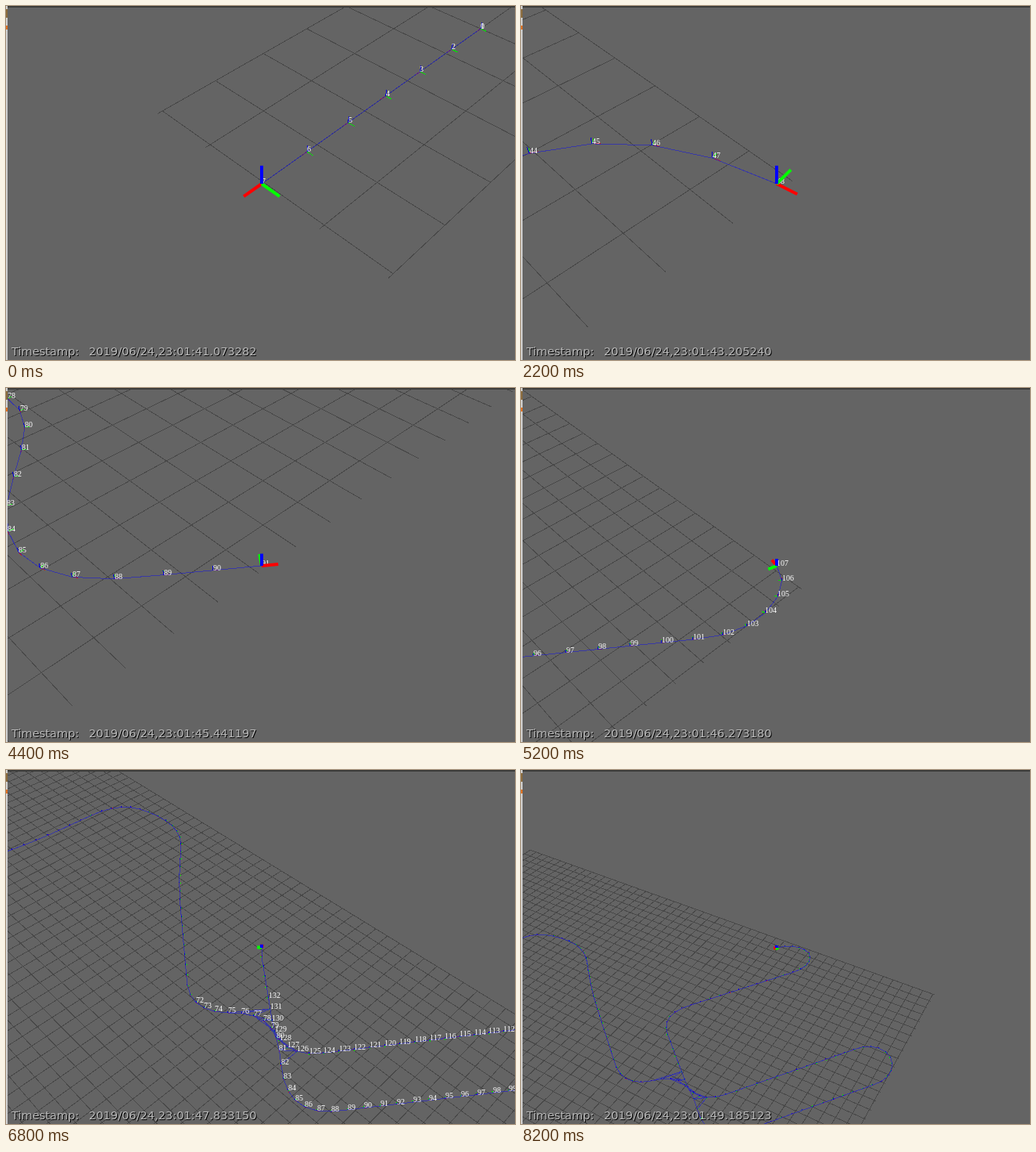
These frames come from a looping animation (651 px wide and 452 px high, 8.4 s). An HTML page:

```html
<!DOCTYPE html>
<html lang="en">
<head>
<meta charset="utf-8">
<title>Trajectory viewer</title>
<style>
  html, body { margin: 0; width: 100%; height: 100%; overflow: hidden; background: #646464; }
  svg { display: block; width: 651px; height: 452px; }
  path { fill: none; shape-rendering: crispEdges; }
  #labels { font: 10px "Liberation Serif", serif; fill: #fff; }
  #axes line { stroke-width: 4; }
  .stamp { font: 14.6px "DejaVu Sans", sans-serif; }
</style>
</head>
<body>
<svg viewBox="0 0 651 452">
  <rect width="651" height="452" fill="#646464"/>
  <path id="grid" stroke="#484848"/>
  <path id="nodeX" stroke="#d01414"/>
  <path id="nodeY" stroke="#00e000"/>
  <path id="track" stroke="#2222c8" stroke-opacity=".65"/>
  <path id="nodeZ" stroke="#0000d8"/>
  <g id="labels"></g>
  <g id="axes">
    <line stroke="#f00"/>
    <line stroke="#0f0"/>
    <line stroke="#00f"/>
  </g>
  <g class="stamp" fill="#000" transform="translate(1 1)">
    <text x="7" y="446">Timestamp:</text><text class="time" x="106" y="446"></text>
  </g>
  <g class="stamp" fill="#b8b8b8">
    <text x="7" y="446">Timestamp:</text><text class="time" x="106" y="446"></text>
  </g>
  <rect width="651" height="2" fill="#3c3c3a"/>
  <rect width="2" height="452" fill="#cfcfcf"/>
  <rect y="4" width="2" height="11" fill="#8a6a3c"/>
  <rect y="25" width="2" height="5" fill="#e07020"/>
</svg>
<script>
const STEP = 200, LOOP = 8400, POSES = 164;
const FOCAL = 843, CX = 327, CY = 227, NEAR = 0.5;
const R = Math.SQRT1_2;
const PHASE = 0.55;                   // grid offset along its first axis
const START = { a: 9.55, b: -40 };
const LABEL_DEPTH = 41;
const SMOOTHING = 3;                  // how many poses a corner is rounded over, each way

// The drive as a few corners: pose number, ground position
const CORNERS = [
  [1, -35.04, 21.53], [12.5, -41.86, 14.71], [18.5, -38.04, 10.89], [36, -23.4, 19.7],
  [45.1, -16.6, 26.2], [51.6, -11.15, 22.3], [59, -10.85, 15.1], [72.6, -9.05, 2.6],
  [78, -3.95, 3], [85.4, -3.3, -4.3], [104.2, 13.5, -2.1], [107.8, 13.4, 1.95],
  [126.9, -3.75, -0.55], [138.9, -5, 10.15], [155.9, 11, 12.9], [160, 10.6, 16.6],
  [166, 4.9, 16.3]
];

const POSE_KEYS = [[0, 7], [1200, 31], [3000, 63], [6000, 123], [8200, 163]];
const ZOOM_KEYS = [[0, 8.2], [3830, 8.2], [6000, 37.1], [6800, 44], [8200, 67.3]]
  .map(([time, dist]) => [time, Math.log(dist)]);

const $ = id => document.getElementById(id);
const lerp = (a, b, k) => a + (b - a) * k;
const radians = degrees => degrees * Math.PI / 180;

function follow(keys, x, column = 1) {
  let i = 0;
  while (i < keys.length - 2 && keys[i + 1][0] <= x) i++;
  const p = keys[i], q = keys[i + 1];
  return lerp(p[column], q[column], (x - p[0]) / (q[0] - p[0]));
}

// A moving average along the straight legs rounds the corners
function position(n) {
  const samples = 24, centre = Math.max(1, n);
  let u = 0, v = 0;
  for (let i = 0; i < samples; i++) {
    const at = centre + SMOOTHING * ((2 * i + 1) / samples - 1);
    u += follow(CORNERS, at, 1) / samples;
    v += follow(CORNERS, at, 2) / samples;
  }
  return { u, v };
}

const poses = Array.from({ length: POSES }, (_, n) => {
  const { u, v } = position(n), next = position(Math.max(1, n) + 0.3);
  const len = Math.hypot(next.u - u, next.v - v);
  const heading = [(next.u - u) / len, (next.v - v) / len];
  return { u, v, heading, a: -(u + v) * R, b: (u - v) * R };
});

const labels = poses.map((_, n) => {
  const text = document.createElementNS("http://www.w3.org/2000/svg", "text");
  text.textContent = n;
  $("labels").append(text);
  return text;
});

const camera = {};

function aim({ u, v }, time) {
  const swing = Math.max(0, (time - 6800) / 1400);
  const turn = radians(15.5 * swing), tilt = radians(45 - 5 * swing);
  Object.assign(camera, {
    u, v, dist: Math.exp(follow(ZOOM_KEYS, time)),
    cosTurn: Math.cos(turn), sinTurn: Math.sin(turn),
    cosTilt: Math.cos(tilt), sinTilt: Math.sin(tilt)
  });
}

function toView(u, v, z = 0) {
  const { cosTurn, sinTurn, cosTilt, sinTilt, dist } = camera;
  const du = u - camera.u, dv = v - camera.v;
  const away = du * sinTurn + dv * cosTurn;
  return {
    x: du * cosTurn - dv * sinTurn,
    y: away * sinTilt + z * cosTilt,
    depth: dist + away * cosTilt - z * sinTilt
  };
}

const toScreen = p => [CX + FOCAL * p.x / p.depth, CY - FOCAL * p.y / p.depth];

function clip(p, q) {
  if (p.depth >= NEAR) return p;
  const k = (NEAR - p.depth) / (q.depth - p.depth);
  return { x: lerp(p.x, q.x, k), y: lerp(p.y, q.y, k), depth: NEAR };
}

function segment(p, q) {
  if (p.depth < NEAR && q.depth < NEAR) return "";
  const point = s => toScreen(s).map(c => c.toFixed(1)).join(" ");
  return `M${point(clip(p, q))}L${point(clip(q, p))}`;
}

const gridPoint = (a, b) => toView((b - a) * R, -(a + b) * R);

// The grid grows with the area covered so far
function gridPath(seen) {
  const as = seen.map(p => p.a), bs = seen.map(p => p.b);
  const aMin = Math.min(START.a - 2, PHASE + Math.floor(Math.min(...as) - PHASE + 0.35));
  const aMax = Math.max(...as) + 0.05;
  const bMin = START.b - 2;
  const bMax = Math.max(START.b + 2, Math.max(...bs) + 0.1);
  let d = "";
  for (let a = aMin; a <= aMax; a++) d += segment(gridPoint(a, bMin), gridPoint(a, bMax));
  for (let b = bMin; b <= bMax; b++) d += segment(gridPoint(aMin, b), gridPoint(aMax, b));
  return d;
}

function axisEnds({ u, v, heading: [hu, hv] }, size) {
  return [
    toView(u + hu * size, v + hv * size),
    toView(u - hv * size, v + hu * size),
    toView(u, v, size)
  ];
}

function trackPath(views) {
  let d = "";
  for (let n = 1; n < views.length; n++) {
    d += segment(views[n - 1], views[n]);
    // links between the two passes over the same stretch
    if (n >= 126 && n <= 131)
      for (const sum of [206, 207, 208]) d += segment(views[n], views[sum - n]);
  }
  return d;
}

function drawLabels(views) {
  labels.forEach((text, n) => {
    const view = views[n];
    const shown = view && view.depth > NEAR && view.depth < LABEL_DEPTH;
    text.style.display = shown ? "" : "none";
    if (!shown) return;
    const [x, y] = toScreen(view);
    text.setAttribute("x", Math.round(x));
    text.setAttribute("y", Math.round(y));
  });
}

function draw(time) {
  const count = Math.floor(follow(POSE_KEYS, time) + 0.01);
  const seen = poses.slice(0, count + 1), car = poses[count];
  aim(car, time);

  const views = seen.map(p => toView(p.u, p.v));
  $("grid").setAttribute("d", gridPath(seen));
  $("track").setAttribute("d", trackPath(views));

  const ticks = ["", "", ""];
  seen.slice(0, -1).forEach((pose, n) =>
    axisEnds(pose, 0.11).forEach((end, i) => ticks[i] += segment(views[n], end)));
  ["nodeX", "nodeY", "nodeZ"].forEach((id, i) => $(id).setAttribute("d", ticks[i]));

  drawLabels(views);

  const ends = axisEnds(car, 0.31);
  document.querySelectorAll("#axes line").forEach((line, i) => {
    const [x, y] = toScreen(ends[i]);
    Object.entries({ x1: CX, y1: CY, x2: x, y2: y })
      .forEach(([name, value]) => line.setAttribute(name, value));
  });

  const seconds = 41.073282 + (count - 7) * 0.0519989825;
  const stamp = "2019/06/24,23:01:" + seconds.toFixed(6);
  document.querySelectorAll(".time").forEach(text => text.textContent = stamp);
}

let begin = null, last = -1;
function tick(now) {
  begin ??= now;
  const step = Math.floor(((now - begin) % LOOP) / STEP);
  if (step !== last) draw((last = step) * STEP);
  requestAnimationFrame(tick);
}
draw(0);
requestAnimationFrame(tick);
</script>
</body>
</html>
```
